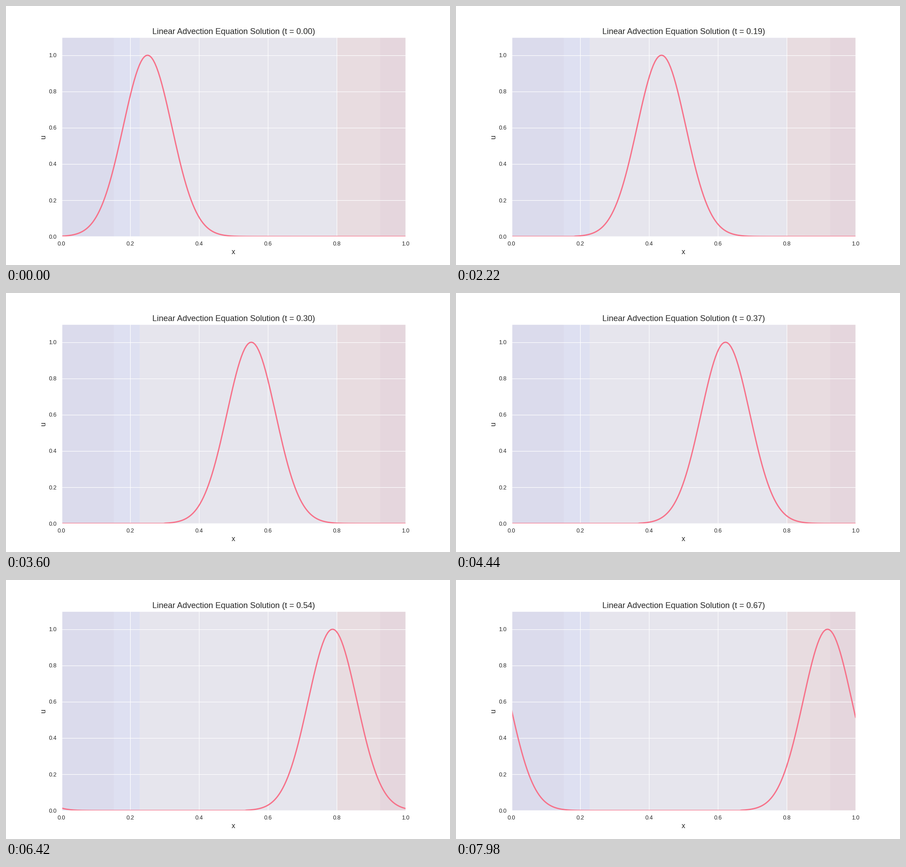
Animation of 980x572 px, one loop 8 s. Source, as a matplotlib script:

```python
import numpy as np
import matplotlib.pyplot as plt
from matplotlib.animation import FuncAnimation

W, H, DPI = 980, 572, 80
TICK_MS, STEP_MS, LOOP_MS = 20, 60, 8000
N = 200
INK = "#262626"


def pt(size):
    """Scale point sizes designed for a 12 inch wide figure."""
    return size * W / (12 * DPI)


plt.rcParams["font.family"] = "Liberation Sans"
fig = plt.figure(figsize=(W / DPI, H / DPI), dpi=DPI, facecolor="white")
ax = fig.add_axes([0.125, 0.11, 0.775, 0.77], facecolor="#EAEAF2")
ax.set_xlim(0, 1)
ax.set_ylim(0, 1.1)

# Background bands, cool to warm
edges = [0, 0.152, 0.2275, 0.8, 0.926, 1]
tints = ["#DBDBEC", "#DEE0F1", "#E6E5ED", "#E8DCE0", "#E5D6DD"]
for left, right, tint in zip(edges, edges[1:], tints):
    ax.axvspan(left, right, color=tint, lw=0, zorder=0)

ax.set_axisbelow(True)
ax.grid(True, color="white", lw=pt(1))
ax.set_xticks(np.arange(6) / 5)
ax.set_yticks(np.arange(6) / 5)
ax.tick_params(length=0, pad=pt(9.5), labelsize=pt(11), labelcolor=INK)
for spine in ax.spines.values():
    spine.set(color="white", linewidth=pt(1.25))

ax.set_xlabel("x", fontsize=pt(14), color=INK, labelpad=pt(4))
ax.set_ylabel("u", fontsize=pt(14), color=INK, labelpad=pt(4))
title = ax.set_title("", fontsize=pt(16), color=INK, pad=pt(6))

x = np.linspace(0, 1, N)
u0 = np.exp(-100 * (x - 0.25) ** 2)
cells = np.arange(N)
line, = ax.plot(x, u0, color="#F77189", lw=pt(2.5), solid_capstyle="round")


def update(frame):
    # The pulse moves one cell per step; the inflow copies the next-to-last cell
    step = frame * TICK_MS // STEP_MS
    origin = cells - step
    origin = np.where(origin < 0, origin + N - 2, origin)
    line.set_ydata(u0[origin])
    title.set_text(f"Linear Advection Equation Solution (t = {step / (N - 1):.2f})")
    return line, title


anim = FuncAnimation(fig, update, frames=LOOP_MS // TICK_MS,
                     interval=TICK_MS, repeat=True, repeat_delay=0)
plt.show()
```
